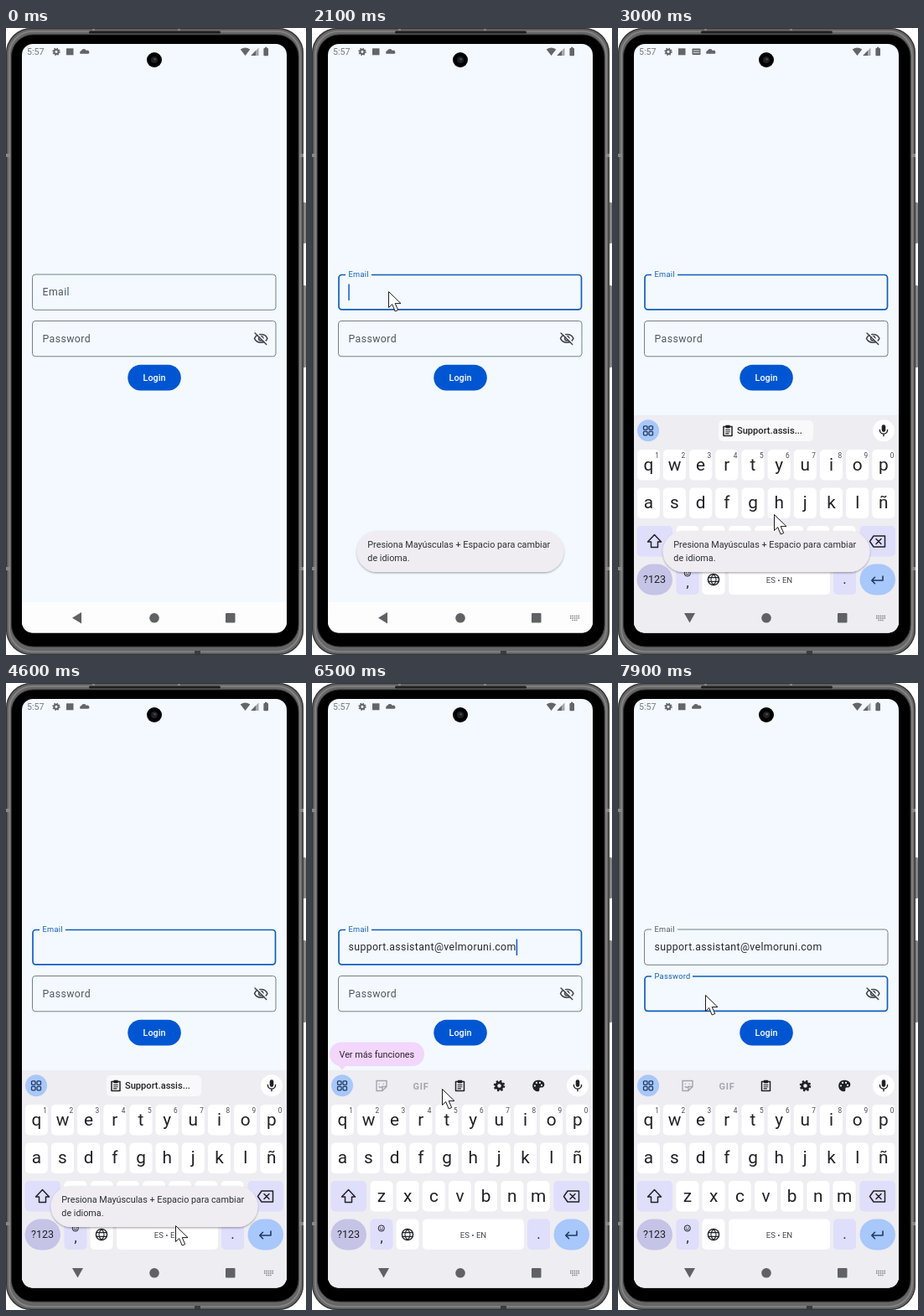
Animation, 358 px wide and 748 px high, one loop 8 s. Source, as an HTML page:

```html
<!DOCTYPE html>
<html lang="es">
<head>
<meta charset="utf-8">
<title>Login</title>
<style>
  html, body { margin: 0; width: 100%; height: 100%; overflow: hidden; background: #fff; }
  svg { display: block; width: 358px; height: 748px; font-family: Roboto, "Open Sans", sans-serif; }
  text { white-space: pre; }
  .mid { text-anchor: middle; }
  .line { fill: none; stroke: currentColor; stroke-linecap: round; stroke-linejoin: round; }
</style>
</head>
<body>
<svg id="stage" viewBox="0 0 358 748"></svg>
<script>
const LOOP = 8000, TICK = 100;
const BG = '#f3f9fe', BLUE = '#115dbd', GREY = '#74808a', BOARD = '#eeedf2', LILAC = '#dfdefb', SKY = '#a8c7fa';
const EMAIL = 'support.assistant@velmoruni.com';

const rect = (x, y, w, h, r, fill, more = '') =>
  `<rect x="${x}" y="${y}" width="${w}" height="${h}" rx="${r}" fill="${fill}" ${more}/>`;
const circle = (x, y, r, fill, more = '') => `<circle cx="${x}" cy="${y}" r="${r}" fill="${fill}" ${more}/>`;
const path = (d, fill, more = '') => `<path d="${d}" fill="${fill}" ${more}/>`;
const line = (d, width = 1.4, more = '') => `<path class="line" d="${d}" stroke-width="${width}" ${more}/>`;
const text = (x, y, size, fill, str, more = '') =>
  `<text x="${x}" y="${y}" font-size="${size}" fill="${fill}" ${more}>${str}</text>`;
const group = (content, more = '') => `<g ${more}>${content}</g>`;
const at = (x, y, content, color = '#202124', scale = 1) =>
  group(content, `transform="translate(${x} ${y}) scale(${scale})" color="${color}"`);

const gear = (x, y, color, scale) => at(x, y,
  circle(0, 0, 3.6, 'none', 'stroke="currentColor" stroke-width="2.8"') +
  circle(0, 0, 5.4, 'none', `stroke="currentColor" stroke-width="2.2" stroke-dasharray="${5.4 * Math.PI / 8}"`), color, scale);

const miniKeyboard = (x, y, color) => {
  let dots = '';
  for (let row = 0; row < 3; row++) {
    const half = row > 1 ? 3 : 5.5;
    dots += line(`M${-half} ${row * 2.6 - 2.6}H${half}`, 1.5, 'style="stroke-linecap:butt" stroke-dasharray="1.4 1"');
  }
  return at(x, y, dots, color);
};

const clipboard = (x, y) => at(x, y,
  line('M-3 -5H-5V6H5V-5H3', 1.5) + rect(-2.8, -6.8, 5.6, 3.8, 1, 'currentColor') +
  line('M-2.4 -1H2.4M-2.4 1.2H2.4M-2.4 3.4H1', 1.1));

// Nested rounded outline, inset from the outer edge of the phone.
const rim = (inset, color, width) =>
  rect(inset, inset, 355 - 2 * inset, 748 - 2 * inset, 30 - inset * .6, 'none', `stroke="${color}" stroke-width="${width}"`);

function phone() {
  const bands = [[0, 150], [0, 643], [350, 150], [350, 643]].map(([x, y]) => rect(x, y, 5, 4, 0, '#888')).join('');
  return rect(352, 208, 6, 49, 1.5, '#858585') + rect(352, 307, 6, 98, 1.5, '#858585') +
    rect(354, 209, 1, 47, 0, '#444') + rect(354, 308, 1, 96, 0, '#444') +
    rect(0, 0, 355, 748, 30, '#666') + rim(.6, '#333', 1.2) + rim(4, '#868686', 1.6) + bands +
    rect(103, 1, 3, 5, 0, '#858585') + rect(205, 1, 3, 5, 0, '#858585') + rect(225, 743, 7, 4, 0, '#3c3c3c') +
    rect(6.5, 8, 342.5, 730, 26, '#000', 'stroke="#2b2b2b"') +
    rect(99, 3.5, 157, 3, 1.5, '#1e1e1e') + rect(19, 19, 316, 702.5, 13, BG);
}

function statusBar() {
  const grey = '#626569', cloud = 'M-5.5 3A2.6 2.6 0 0 1 -4 -1A3.6 3.6 0 0 1 2.7 -1A2.3 2.3 0 0 1 5.5 3Z';
  return text(25, 32, 10.6, '#777b80', '5:57') + gear(60, 28.3, grey, .72) + rect(72, 24.3, 8.5, 8, 0, grey) +
    group(rect(88.5, 24.5, 10, 7.5, 1, grey) + line('M90.3 27H97M90.3 29.5H97', 1, `color="${BG}" stroke-dasharray="1 1.2"`), 'id="statusKeys"') +
    group(path(cloud, grey, 'transform="scale(.9)"'), 'id="cloud"') +
    path('M279.7 25.5Q285.5 21.5 291.3 25.5L285.5 33Z', grey) +
    path('M301.5 23.5V33H292.3Z', '#a5a8ab') + path('M298 27V33H292.3Z', grey) +
    rect(307.4, 24, 5.6, 9.2, 1, grey) + rect(309, 22.8, 2.4, 2, 0, grey) +
    circle(177, 38, 9, '#000') + circle(177, 38, 4, '#1e2024') + circle(177.6, 37.2, 1.3, '#4a4c55');
}

const field = (id, y, label) => group(
  rect(31.5, y, 290.5, 42.3, 3.5, 'none', 'class="border"') +
  rect(40, y - 3, 0, 6, 0, BG, 'class="gap"') +
  text(0, 0, 12.3, GREY, label, 'class="label" letter-spacing=".4"') +
  rect(43.3, y + 11.5, 1.5, 19.5, 0, BLUE, 'class="caret"'), `id="${id}"`);

const eyeOff = at(295, 361.5,
  line('M2 11.5C5.6 3.1 18.4 3.1 22 11.5C18.4 19.9 5.6 19.9 2 11.5Z', 2) +
  circle(12, 11.5, 3.4, 'none', 'stroke="currentColor" stroke-width="2"') +
  line('M4 1.6L22 19.6', 2.2, `color="${BG}"`) + line('M2.7 3.2L20.4 20.9', 2), '#43474e', .769);

const key = (x, y, w, fill) => rect(x, y, w, 36.5, 5, fill);
const pitch = 31.17;

function letterRow(letters, firstX, y, hints) {
  return [...letters].map((ch, i) => {
    const x = firstX + i * pitch;
    return key(x - 13.5, y, 27, '#fff') + text(x, y + 24.5, 20.8, '#202124', ch, 'class="mid"') +
      (hints ? text(x + 10.3, y + 9.5, 8.3, '#44474c', (i + 1) % 10, 'class="mid"') : '');
  }).join('');
}

function toolbar() {
  const chip = rect(120, 468, 113, 25, 5, '#f9f9fc') + clipboard(131, 480.5) +
    group(rect(131, 479, 7.5, 7, 1, '#202124', 'stroke="#f9f9fc"'), 'id="chipBadge"') +
    text(142, 484.3, 11.1, '#202124', '', 'id="chipText" font-weight="500"');
  const sticker = at(83, 480.5, line('M6 1V-6H-6V6H1L6 1H1V6', 1.4) + line('M-2.8 -2.5V-2M2.2 -2.5V-2M-3 1Q-1 3 1 1', 1.2), '#a4a5aa');
  const palette = at(270, 480.5,
    path('M0 -6.8C9 -6.8 9 2 4 2H2.5C0 2 2.8 6.8 0 6.8C-9 6.8 -9 -6.8 0 -6.8Z', '#202124') +
    [[-4, 0], [-2, -3.6], [2, -3.6], [4, -.6]].map(([x, y]) => circle(x, y, 1.1, BOARD)).join(''));
  const tools = sticker + text(130, 484.5, 11, '#a4a5aa', 'GIF', 'class="mid" font-weight="700" letter-spacing=".7"') +
    clipboard(176.5, 480.5) + gear(223.5, 480.5, '#202124', 1.05) + palette;
  const squares = [[-5.5, -5.5], [1, -5.5], [-5.5, 1], [1, 1]]
    .map(([x, y]) => rect(x, y, 4.5, 4.5, 1, 'none', 'stroke="#1f3a63" stroke-width="1.3"')).join('');
  const mic = rect(-2.3, -7, 4.6, 8.6, 2.3, 'currentColor') + line('M-4.6 -.8A4.6 4.6 0 0 0 4.6 -.8M0 4V6.5', 1.4);
  return circle(36, 480.3, 13, SKY) + at(36, 480.3, squares) + circle(317, 480.3, 13, '#fff') + at(317, 480.3, mic) +
    group(chip, 'id="chip"') + group(tools, 'id="tools"');
}

function keyboard() {
  const shift = line('M0 -8L8 .5H4V7H-4V.5H-8Z', 1.5);
  const erase = line('M-9 0L-4.5 -6.5H9V6.5H-4.5ZM-1.5 -3L4.5 3M4.5 -3L-1.5 3', 1.5);
  const globe = circle(0, 0, 6.6, 'none', 'stroke="currentColor" stroke-width="1.4"') +
    line('M-6 -2.3H6M-6 2.3H6M0 -6.5C-4 -2.5 -4 2.5 0 6.5C4 2.5 4 -2.5 0 -6.5', 1.2);
  const smile = circle(0, 0, 3.6, 'none', 'stroke="currentColor"') + line('M-1.3 -1V-.8M1.3 -1V-.8M-1.7 1Q0 2.6 1.7 1', .9);
  return rect(19, 462, 316, 261, 0, BOARD) + toolbar() +
    letterRow('qwertyuiop', 36.3, 503, true) + letterRow('asdfghjklñ', 36.3, 548.5) + letterRow('zxcvbnm', 83, 594) +
    key(22.5, 594, 42.5, LILAC) + at(43.5, 612.5, shift) + key(288.5, 594, 42.5, LILAC) + at(309.5, 612.5, erase) +
    rect(22.5, 639.5, 42.5, 37, 18.5, '#c5c3e6') + text(43.5, 662.3, 12.5, '#202124', '?123', 'class="mid"') +
    key(69.5, 639.5, 27, LILAC) + at(82.8, 650.5, smile) + text(83, 667, 16, '#202124', ',', 'class="mid"') +
    key(100.5, 639.5, 27, '#fff') + at(114, 658, globe) +
    key(132, 639.5, 121, '#fff') + text(192.5, 661.5, 9.6, '#44474c', 'ES • EN', 'class="mid"') +
    key(257, 639.5, 27, LILAC) + text(270.5, 663, 17, '#202124', '.', 'class="mid"') +
    rect(288.5, 639.5, 42.5, 37, 18.5, SKY) + at(309.5, 658, line('M6.5 -4V1H-6.5M-3 -2.7L-6.7 1L-3 4.7', 1.6), '#1f3a63');
}

function toast() {
  return rect(53.5, 600, 247, 49, 24.5, '#efedf1', 'filter="url(#shadow)"') +
    text(66.3, 620, 10.8, '#2e2f33', 'Presiona Mayúsculas + Espacio para cambiar') +
    text(66.3, 635.5, 10.8, '#2e2f33', 'de idioma.');
}

const navBar = path('', '#606164', 'id="back"') + circle(177, 703.8, 5.8, '#606164') + rect(262, 698, 11.5, 11.5, 1, '#606164') +
  group(miniKeyboard(313.5, 704, '#75777b'), 'id="navKeys"');

const stage = document.getElementById('stage');
stage.innerHTML = `<defs>
    <filter id="shadow" x="-10%" y="-20%" width="120%" height="150%"><feDropShadow dx="0" dy="1.2" stdDeviation="1.3" flood-opacity=".35"/></filter>
    <clipPath id="screen">${rect(19, 19, 316, 702.5, 13, '#000')}</clipPath>
  </defs>` + phone() + group(
  rect(19, 685, 316, 38, 0, '#fdfdfe') + statusBar() +
  field('email', 294, 'Email') + field('password', 349.5, 'Password') + eyeOff +
  text(43.5, 319.3, 12.3, '#24282d', EMAIL, 'id="typed" letter-spacing=".38"') +
  rect(145.3, 401.8, 63.5, 30.8, 15.4, '#0056d2') +
  text(177, 421, 10.8, '#fff', 'Login', 'class="mid" font-weight="500"') +
  group(keyboard(), 'id="keyboard"') + navBar +
  group(rect(21, 428.5, 113, 28.5, 14, '#f3d6fb') + path('M31 456H41L36 461.5Z', '#f3d6fb') +
    text(32.5, 446.5, 10.8, '#2b2231', 'Ver más funciones'), 'id="tip"') +
  group(toast(), 'id="toast"'), 'clip-path="url(#screen)"') +
  path('M.5 .5V19.5L4.7 15.6L8.2 24L11.7 22.5L8.2 14.6H15Z', '#fff', 'id="pointer" stroke="#1b1b1b" stroke-linejoin="round"');

const $ = id => document.getElementById(id);
const set = (el, attrs) => { for (const name in attrs) el.setAttribute(name, attrs[name]); };
const show = (id, on) => set($(id), { visibility: on ? 'visible' : 'hidden' });
const ramp = (t, from, to) => Math.min(1, Math.max(0, (t - from) / (to - from)));
const easeOut = p => 1 - (1 - p) ** 3;

// time, x, y of the mouse pointer tip
const route = [
  [1000, 97, 321], [1100, 91, 314], [2300, 91, 314], [2900, 184, 572], [3000, 186, 580], [3200, 190, 598],
  [3700, 209, 713], [4000, 209, 713], [4300, 205, 713], [4500, 205, 713], [4600, 202, 647], [5300, 103, 361],
  [5500, 103, 361], [6000, 150, 481], [6300, 150, 481], [6500, 155, 484], [6600, 155, 484], [7100, 103, 371],
  [7800, 103, 371], [7900, 104, 372], [8000, 104, 372]
];

function pointerAt(t) {
  const i = Math.max(1, route.findIndex(stop => stop[0] > t));
  const [t0, x0, y0] = route[i - 1], [t1, x1, y1] = route[i], p = ramp(t, t0, t1);
  return [Math.round(x0 + (x1 - x0) * p), Math.round(y0 + (y1 - y0) * p)];
}

function drawField(id, y, { focused, lift, caret, caretX = 43.3, gap }) {
  const part = name => $(id).querySelector('.' + name);
  const scale = 1 - .25 * lift, inset = focused ? .5 : 0;
  set(part('border'), {
    x: 31.5 + inset, y: y + inset, width: 290.5 - 2 * inset, height: 42.3 - 2 * inset,
    stroke: focused ? BLUE : GREY, 'stroke-width': focused ? 1.7 : 1
  });
  set(part('gap'), { width: gap * lift });
  set(part('label'), {
    transform: `translate(43.5 ${y + 25.3 - 22.3 * lift}) scale(${scale})`,
    fill: focused ? BLUE : '#50585f'
  });
  set(part('caret'), { visibility: caret ? 'visible' : 'hidden', x: caretX });
}

const blink = (t, since) => Math.floor((t - since) / 500) % 2 === 0;
const typedEnd = () => 43.5 + $('typed').getComputedTextLength();

function draw(t) {
  const focusAt = 1100, boardAt = 2400, pasteAt = 6200, passwordAt = 7200;
  const pasted = t >= pasteAt, onPassword = t >= passwordAt, onEmail = t >= focusAt && !onPassword;

  drawField('email', 294, {
    focused: onEmail, lift: easeOut(ramp(t, focusAt - 50, focusAt + 150)), gap: 31,
    caret: onEmail && blink(t, pasted ? pasteAt : focusAt), caretX: pasted ? typedEnd() : 43.3
  });
  drawField('password', 349.5, {
    focused: onPassword, lift: easeOut(ramp(t, passwordAt - 50, passwordAt + 150)), gap: 49,
    caret: onPassword && blink(t, passwordAt)
  });
  show('typed', pasted);

  const rise = easeOut(ramp(t, boardAt - 50, boardAt + 350));
  set($('keyboard'), { transform: `translate(0 ${262 * (1 - rise)})` });
  set($('back'), { d: t >= boardAt ? 'M79 698H92L85.5 709.5Z' : 'M79 703.7L90 697V710.4Z' });
  show('navKeys', t >= 1300);
  const noticed = t >= 2700 && t < 4200;
  show('statusKeys', noticed);
  set($('cloud'), { transform: `translate(${noticed ? 110.5 : 93.5} 28)` });

  const recopied = t >= 5000;
  $('chipText').textContent = recopied ? 'support.assis...' : 'Support.assis...';
  show('chipBadge', recopied && !pasted);
  show('chip', !pasted);
  show('tools', pasted);
  show('tip', t >= 6500 && t < 7200);
  set($('toast'), { opacity: ramp(t, 1150, 1500) * (1 - ramp(t, 4650, 4950)) });

  show('pointer', t >= route[0][0]);
  set($('pointer'), { transform: `translate(${pointerAt(t)})` });
}

const start = performance.now();
function loop() {
  const t = (performance.now() - start) % LOOP;
  draw(Math.floor(t / TICK) * TICK);
  requestAnimationFrame(loop);
}
loop();
</script>
</body>
</html>
```
